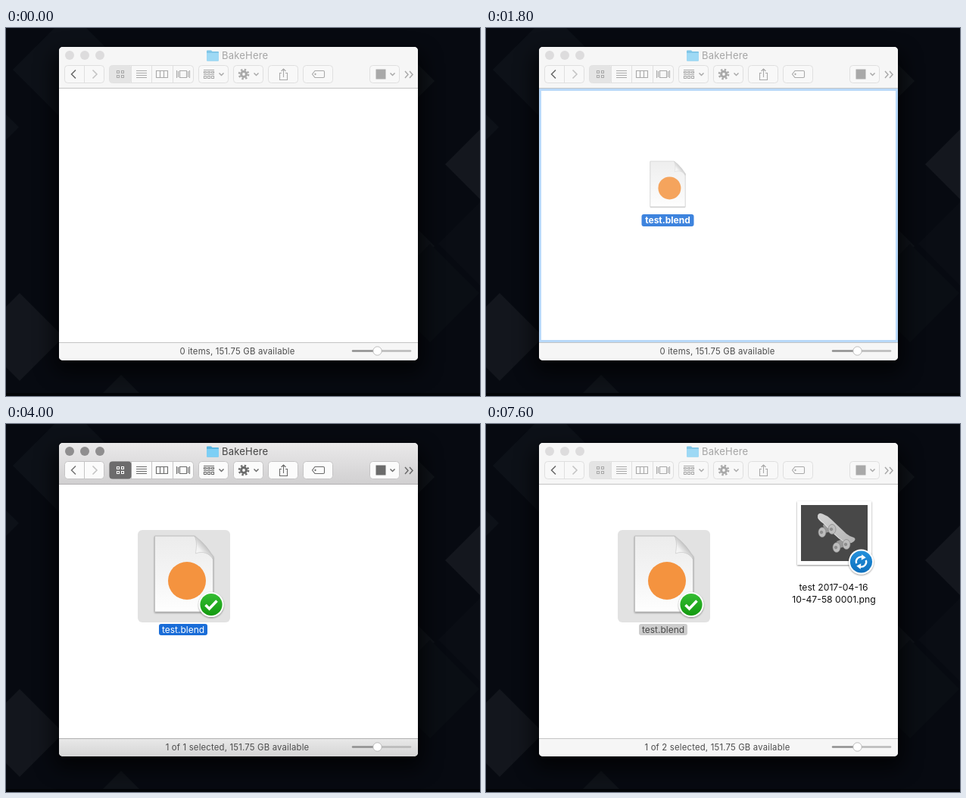
Write an HTML page that moves like this. It is 626 px wide and 486 px high and loops after 7740 ms.

```html
<!DOCTYPE html>
<html lang="en">
<head>
<meta charset="utf-8">
<title>Folder drop</title>
<style>
  html, body { margin: 0; width: 100%; height: 100%; overflow: hidden; background: #070a10; }
  svg { display: block; width: 626px; height: 486px; font-family: Inter, "Open Sans", sans-serif; }
  .bar { fill: url(#barOn); }
  .foot { fill: url(#footOn); }
  .edge { stroke: #b1b0b1; }
  .light { fill: #8f8e8f; }
  .title { font-size: 13px; letter-spacing: .2px; fill: #444; }
  .status { font-size: 11.3px; letter-spacing: .2px; fill: #4c4c4c; text-anchor: middle; }
  .button { fill: #fbfbfb; stroke: #c5c4c5; }
  .pressed { fill: #6c6b6c; }
  .icon { fill: none; stroke: #6b6b6b; stroke-width: 1.1; }
  .solid { fill: #6b6b6b; stroke: none; }
  .on { fill: none; stroke: #fff; stroke-width: 1.1; }
  .back { fill: none; stroke: #737373; stroke-width: 1.5; }
  .next { fill: none; stroke: #c3c3c3; stroke-width: 1.5; }
  .label { font-size: 12px; text-anchor: middle; fill: #fff; }
  .tag { fill: #1a6dd8; }
  .caption { font-size: 12.2px; text-anchor: middle; fill: #111; }
  .idle .bar, .idle .foot { fill: #f6f6f6; }
  .idle .edge { stroke: #c4c4c4; }
  .idle .light { fill: #dddcdd; }
  .idle .title { fill: #a5a5a5; }
  .idle .folder { opacity: .72; }
  .idle .button { fill: #f8f8f8; stroke: #dfdfdf; }
  .idle .pressed { fill: #e4e4e4; }
  .idle .icon, .idle .on { stroke: #a9a9a9; }
  .idle .solid { fill: #a9a9a9; stroke: none; }
  .idle .back { stroke: #666; }
  .idle .placed .tag { fill: #cdcdcd; }
  .idle .placed .label { fill: #484848; }
</style>
</head>
<body>
<svg id="stage" viewBox="0 0 626 486">
  <defs>
    <linearGradient id="barOn" x2="0" y2="1"><stop stop-color="#eae9ea"/><stop offset="1" stop-color="#d1d0d1"/></linearGradient>
    <linearGradient id="footOn" x2="0" y2="1"><stop stop-color="#e9e9e9"/><stop offset="1" stop-color="#d5d5d5"/></linearGradient>
    <linearGradient id="paper" x2="0" y2="1"><stop stop-color="#ececec"/><stop offset=".55" stop-color="#f5f5f5"/><stop offset="1" stop-color="#fefefe"/></linearGradient>
    <linearGradient id="curl" x1=".1" y1="1" x2=".75" y2=".3"><stop stop-color="#fff"/><stop offset=".45" stop-color="#f1f1f1"/><stop offset="1" stop-color="#a9a9a9"/></linearGradient>
    <linearGradient id="blue" x2="0" y2="1"><stop stop-color="#2391dc"/><stop offset="1" stop-color="#0f70bd"/></linearGradient>
    <linearGradient id="green" x2="0" y2="1"><stop stop-color="#35bd33"/><stop offset="1" stop-color="#12990f"/></linearGradient>
    <linearGradient id="deck" x2="1" y2="1"><stop stop-color="#d2d2d2"/><stop offset="1" stop-color="#b3b3b3"/></linearGradient>
    <filter id="shade" x="-20%" y="-20%" width="140%" height="150%"><feGaussianBlur stdDeviation="14"/></filter>
    <filter id="soft" x="-20%" y="-20%" width="140%" height="140%"><feDropShadow dx="0" dy="1" stdDeviation="1.3" flood-opacity=".45"/></filter>
    <clipPath id="frame"><rect x="70" y="25" width="474" height="414" rx="5"/></clipPath>

    <g id="doc">
      <path d="M-38.5-50H14L38.5-23V50H-38.5Z" fill="url(#paper)" stroke="#b3b3b3" stroke-width=".7" filter="url(#soft)"/>
      <path d="M14-50C18-42 16-33 15.500-27C25-31 34-27 38.500-19V-23Q28-41 14-50Z" fill="url(#curl)" stroke="#b9b9b9" stroke-width=".5"/>
      <circle cx="4" cy="9" r="25" fill="#f4933f"/>
    </g>
    <path id="arrow" d="M-6.300 2.200A6.600 6.600 0 0 1 1.500-6.400" fill="none" stroke="#fff" stroke-width="2.300"/>
    <g id="turn"><use href="#arrow"/><path d="M.8-9.800L6.200-5.400L.2-2.200Z" fill="#fff"/></g>
    <g id="sync">
      <circle r="16.500" fill="#fff" filter="url(#soft)"/><circle r="14.600" fill="url(#blue)"/>
      <use href="#turn"/><use href="#turn" transform="rotate(180)"/>
    </g>
    <g id="done">
      <circle r="16.500" fill="#fff" filter="url(#soft)"/><circle r="14.600" fill="url(#green)"/>
      <path d="M-7.500 .5L-2.500 5.500L7.500-5" fill="none" stroke="#fff" stroke-width="3.600"/>
    </g>
    <path id="down" d="M-3-1.500L0 1.500L3-1.500"/>
  </defs>

  <rect width="626" height="486" fill="#070a11"/>
  <g id="desk"></g>
  <rect y="482" width="626" height="4" fill="#030508"/>

  <rect x="64" y="34" width="486" height="420" rx="8" opacity=".75" filter="url(#shade)"/>
  <g clip-path="url(#frame)">
    <rect x="70" y="25" width="474" height="414" fill="#fff"/>
    <rect class="bar" x="70" y="25" width="474" height="54"/>
    <rect class="foot" x="70" y="415" width="474" height="24"/>
    <path class="edge" d="M70 79.500H544M70 415.500H544"/>
  </g>
  <g class="light"><circle cx="84" cy="36" r="6"/><circle cx="104" cy="36" r="6"/><circle cx="124" cy="36" r="6"/></g>
  <g class="folder">
    <path d="M265 30.500Q265 29.500 266 29.500H271L272.500 31H280Q281 31 281 32V42.500Q281 43.500 280 43.500H266Q265 43.500 265 42.500Z" fill="#55b4e2"/>
    <path d="M265 33H281V42.500Q281 43.500 280 43.500H266Q265 43.500 265 42.500Z" fill="#7dcff5"/>
  </g>
  <text class="title" x="285" y="41">BakeHere</text>

  <g id="buttons"></g>
  <rect class="pressed" x="136.500" y="49.500" width="29" height="23" rx="4"/>
  <path class="back" d="M92 55.500L86.500 61L92 66.500"/>
  <path class="next" d="M114.500 55.500L120 61L114.500 66.500"/>
  <path class="on" d="M146.500 56.500h3v3h-3zM152.500 56.500h3v3h-3zM146.500 62.500h3v3h-3zM152.500 62.500h3v3h-3z"/>
  <g class="icon">
    <path d="M172 56.500H186M172 59.500H186M172 62.500H186M172 65.500H186"/>
    <path d="M198.500 56.500H213.500V65.500H198.500ZM203.500 56.500V65.500M208.500 56.500V65.500"/>
    <path d="M229.500 56.500H238.500V65.500H229.500ZM225.500 56V66M227.500 57V65M240.500 57V65M242.500 56V66"/>
    <path d="M261 55.500H275M261 61.500H275"/>
    <path d="M261.500 57.500h3v2h-3zM266.500 57.500h3v2h-3zM271.500 57.500h3v2h-3zM261.500 63.500h3v3h-3zM266.500 63.500h3v3h-3zM271.500 63.500h3v3h-3z"/>
    <circle cx="314" cy="61" r="3.400" stroke-width="3"/>
    <circle cx="314" cy="61" r="6" stroke-width="2.600" stroke-dasharray="2.350 2.362"/>
    <path d="M364 59.500H361.500V68.500H371.500V59.500H369M366.500 65V54M363.500 57L366.500 54L369.500 57"/>
    <path d="M408 56.500H419Q420.500 56.500 420.500 58V64Q420.500 65.500 419 65.500H408L404.500 61Z"/><circle cx="408.500" cy="61" r=".6"/>
    <g stroke-width="1.500">
      <use href="#down" x="284.500" y="61"/><use href="#down" x="330.500" y="61"/><use href="#down" x="510.500" y="61"/>
      <path d="M527 57L531 61.500L527 66M533 57L537 61.500L533 66"/>
    </g>
    <rect class="solid" x="488.500" y="54.500" width="13" height="13"/>
  </g>

  <text class="status" id="status" x="305.500" y="431"></text>
  <g stroke-width="2.500" stroke-linecap="round"><path d="M458 426.500H490" stroke="#8f8f8f"/><path d="M491 426.500H534" stroke="#b9b9b9"/></g>
  <circle cx="490.500" cy="426.500" r="5.700" fill="#fff" stroke="#acacac" stroke-width=".8"/>

  <rect id="target" x="71.500" y="81.500" width="471" height="332" fill="none" stroke="#b9d9f9" stroke-width="3"/>

  <g id="placed" class="placed">
    <rect x="174" y="140" width="122" height="122" rx="6" fill="#e2e2e2"/>
    <use href="#doc" x="235" y="198"/>
    <use id="badgeSync" href="#sync" x="271" y="238.500"/>
    <use id="badgeDone" href="#done" x="271" y="238.500"/>
    <rect class="tag" x="202" y="264" width="64" height="15" rx="3"/>
    <text class="label" x="234" y="276">test.blend</text>
  </g>

  <g id="dragged" opacity=".84">
    <use id="dragDoc" href="#doc"/>
    <g id="dragName"><rect id="dragTag" class="tag" rx="3"/><text id="dragText" class="label" y="4.300">test.blend</text></g>
  </g>

  <g id="render">
    <rect x="411" y="102" width="98" height="84" fill="#fff" filter="url(#soft)"/>
    <rect x="416" y="107" width="88" height="74" fill="#484848"/>
    <g fill="#999"><path d="M445 133L458 130L461 141L447 144Z"/><path d="M463 155L478 149L479 161L466 164Z"/></g>
    <path d="M438 121Q439 117 444 118.500Q451 121 456 126L476 145Q481 149 486 150Q489 152 486 155Q480 160 472 155Q466 152 460 146L445 131Q437 126 438 121Z" fill="url(#deck)"/>
    <path d="M439 124Q442 128 447 132L461 146Q472 157 480 157" fill="none" stroke="#e0e0e0"/>
    <g id="wheels" fill="#bdbdbd" stroke="#858585" stroke-width=".7"></g>
    <text class="caption" x="459" y="220">test 2017-04-16</text>
    <text class="caption" x="459.500" y="236">10-47-58 0001.png</text>
    <use id="renderSync" href="#sync" x="495.500" y="182"/>
  </g>
</svg>
<script>
const LOOP = 7740, STEP = 200 / 3;
const $ = id => document.getElementById(id);
const show = (id, visible) => $(id).setAttribute("display", visible ? "inline" : "none");
const set = (id, attrs) => { for (const k in attrs) $(id).setAttribute(k, attrs[k]); };
const clamp = v => Math.max(0, Math.min(1, v));
const mix = (a, b, p) => a + (b - a) * p;

// Desktop diamonds: centre x, centre y, half diagonal, colour
$("desk").innerHTML = [
  [85, 55, 76, "#0d1118"], [638, 180, 58, "#14171e"], [18, 408, 58, "#13161d"],
  [525, 70, 41, "#10141a"], [525, 288, 41, "#0f1319"], [0, 131, 17, "#0d1118"],
  [152, 490, 32, "#0f1319"], [626, 285, 55, "#0a0d14"], [560, 350, 65, "#0a0e14"]
].map(([x, y, r, fill]) => `<path d="M${x - r} ${y}L${x} ${y - r}L${x + r} ${y}L${x} ${y + r}Z" fill="${fill}"/>`).join("");

// Toolbar buttons: left edge, width, dividers
$("buttons").innerHTML = [
  [77.5, 52, 103.5], [136.5, 111, 165.5, 192.5, 220.5], [254.5, 39], [300.5, 39],
  [346.5, 39], [392.5, 39], [480.5, 39]
].map(([x, w, ...cuts]) => `<rect class="button" x="${x}" y="49.500" width="${w}" height="23" rx="4"/>` +
  cuts.map(c => `<path class="button" d="M${c} 50V72"/>`).join("")).join("");

$("wheels").innerHTML = [[444, 143], [457, 139], [463, 163], [476, 159]]
  .map(([x, y]) => `<ellipse cx="${x}" cy="${y}" rx="5" ry="6.500"/><circle cx="${x - 1}" cy="${y}" r="1.800" fill="#8d8d8d"/>`).join("");

function drawDrag(t) {
  const enter = 1 - Math.pow(1 - clamp((t - 1200) / 400), 1.25);
  const linear = clamp((t - 1800) / 270);
  const grow = linear * linear * (3 - 2 * linear);
  const settle = clamp((t - 2130) / 70);
  const x = mix(mix(600, 240, enter), 235, grow);
  const y = mix(mix(210, 206, enter), 200, grow) - 2 * settle;
  const large = grow > 0.5;
  const w = large ? 64 : 69, h = large ? 15 : 16;
  set("dragDoc", { transform: `translate(${x} ${y}) scale(${mix(0.6, 1, grow)})` });
  set("dragName", { transform: `translate(${x - grow} ${y + mix(48, 73.5, grow)})` });
  set("dragTag", { x: -w / 2, y: -h / 2, width: w, height: h });
  set("dragText", { "font-weight": large ? 400 : 700 });
  return x;
}

function draw(time) {
  const t = Math.floor((time + 4) / STEP) * STEP + 1;
  const dragging = t > 1199 && t < 2260;
  const x = drawDrag(t);
  const hasRender = t > 5460;
  show("dragged", dragging);
  show("target", dragging && x < 544 && t < 2200);
  show("placed", t >= 2260);
  show("badgeSync", t >= 2460 && t < 3460);
  show("badgeDone", t >= 3460);
  show("render", hasRender);
  show("renderSync", t > 5590);
  $("stage").setAttribute("class", t >= 2260 && t < 7460 ? "" : "idle");
  const count = t < 2260 ? "0 items" : `1 of ${hasRender ? 2 : 1} selected`;
  $("status").textContent = `${count}, 151.75 GB available`;
}

const start = performance.now();
function tick() {
  draw((performance.now() - start) % LOOP);
  requestAnimationFrame(tick);
}
tick();
</script>
</body>
</html>
```
